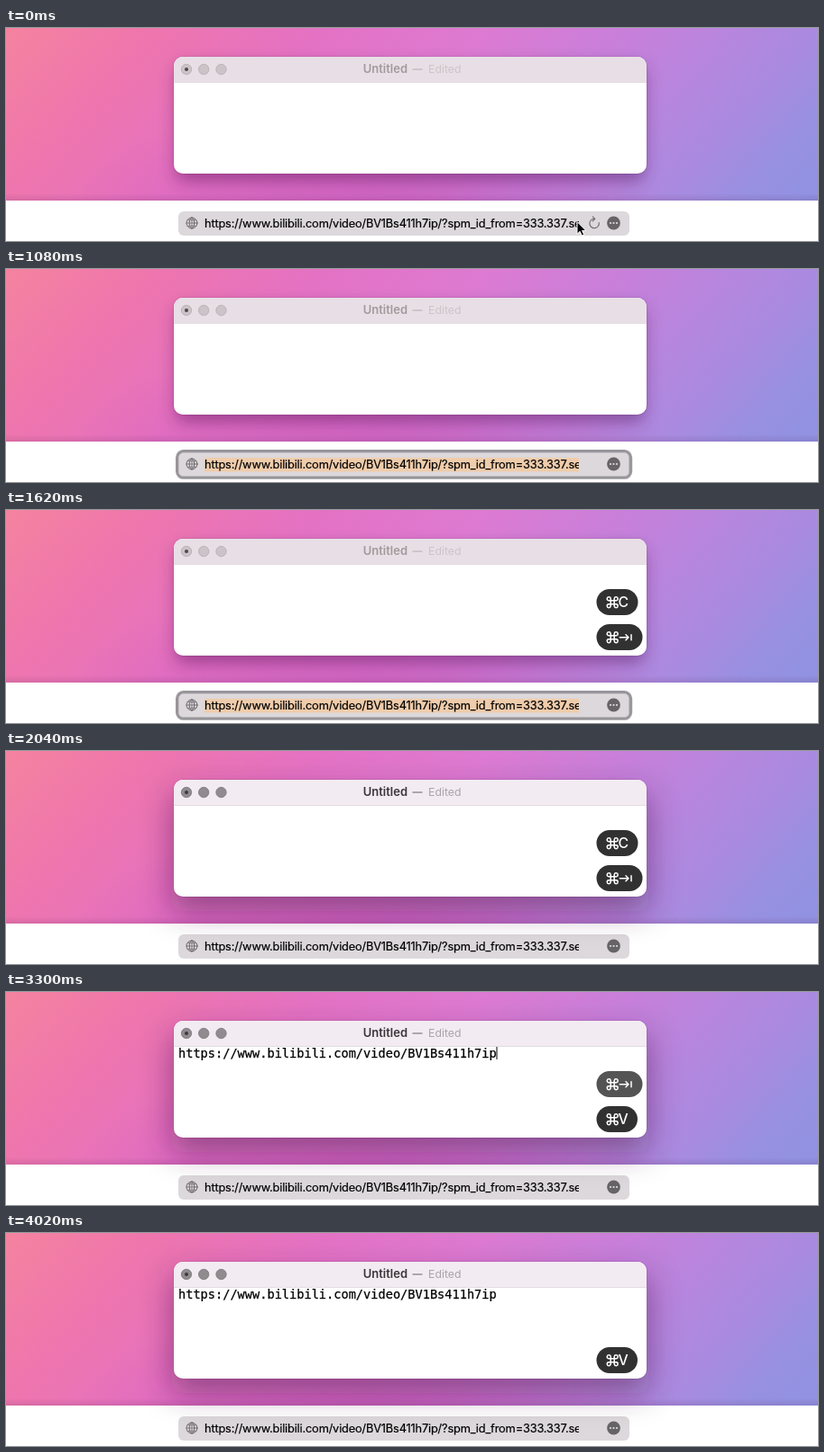
An HTML page that plays this animation: 900 by 237 pixels, repeating every 4080 ms.

```html
<!DOCTYPE html>
<html lang="en">
<head>
<meta charset="utf-8">
<title>Copy and paste an address</title>
<style>
  html, body { margin: 0; width: 100%; height: 100%; overflow: hidden; background: #fff; }
  svg { display: block; width: 900px; height: 237px; }
  text { font-family: Inter, Roboto, sans-serif; white-space: pre; }
  .url { font-size: 12.8px; letter-spacing: -.17px; fill: #000; stroke: #000; stroke-width: .2px; }
  .mono { font: 13.64px "DejaVu Sans Mono", "Liberation Mono", monospace; stroke: #000; stroke-width: .25px; }
  .line { fill: none; stroke-linecap: round; stroke-linejoin: round; }

  /* window colours by state */
  .idle   { --bar: #e8dfe6; --rule: #e4dbe1; --title: #a3989a; --note: #cdc4c9; --light: #cbc3c7; --rim: #b5adb1; --dot: #4b4649; }
  .active { --bar: #f3ebf2; --rule: #e3dbe1; --title: #393538; --note: #aaa3a8; --light: #8f8b8e; --rim: #7b777a; --dot: #3c393b; }
  .bar { fill: var(--bar); }
  .rule { fill: var(--rule); }
  .title { fill: var(--title); font-size: 13px; font-weight: 600; }
  .note { fill: var(--note); font-size: 12.3px; }
  .dash { stroke: var(--title); opacity: .75; }
  .light { fill: var(--light); stroke: var(--rim); stroke-width: .8px; }
  .dot { fill: var(--dot); }

  .pill rect { fill: #323131; }
  .pill text { fill: #fff; font-size: 15.8px; font-weight: 500; }
  .pill use, .pill path { stroke: #fff; stroke-width: 1.5px; }

  .anim { animation: 4080ms step-end infinite; }
  .pointer { animation-name: pointer; }
  .focus { animation-name: focus; }
  .ring { animation-name: ring; animation-timing-function: ease-out; transform-origin: 441px 217.5px; }
  .idle { animation-name: idle; }
  .active { animation-name: active; }
  .pasted { animation-name: pasted; }
  .caret { animation-name: caret; }
  .copy { animation-name: copy; animation-timing-function: linear; }
  .switch { animation-name: switch; animation-timing-function: linear; }
  .paste { animation-name: paste; animation-timing-function: linear; }

  @keyframes pointer { 0% { opacity: 1 } 7.35%, 100% { opacity: 0 } }
  @keyframes focus { 0% { opacity: 0 } 7.35% { opacity: 1 } 44.12%, 100% { opacity: 0 } }
  @keyframes ring {
    0%, 7.35% { opacity: 0; transform: scale(1.03, 1.2) }
    11.76%, 44.11% { opacity: 1; transform: none }
    44.12%, 100% { opacity: 0; transform: none }
  }
  @keyframes idle { 0% { opacity: 1 } 44.12%, 100% { opacity: 0 } }
  @keyframes active { 0% { opacity: 0 } 44.12%, 100% { opacity: 1 } }
  @keyframes pasted { 0% { opacity: 0 } 58.82%, 100% { opacity: 1 } }
  @keyframes caret {
    0% { opacity: 0 } 58.82% { opacity: 1 } 72.06% { opacity: 0 }
    79.41% { opacity: 1 } 94.12%, 100% { opacity: 0 }
  }
  @keyframes copy {
    0%, 27.94% { opacity: 0; transform: none }
    28.92%, 35.29% { opacity: 1; transform: none }
    37.5%, 57.35% { opacity: 1; transform: translateY(-39px) }
    59.56%, 70.59% { opacity: 1; transform: translateY(-78px) }
    79.41%, 100% { opacity: 0; transform: translateY(-78px) }
  }
  @keyframes switch {
    0%, 35.29% { opacity: 0; transform: none }
    37.5%, 57.35% { opacity: 1; transform: none }
    59.56%, 79.41% { opacity: 1; transform: translateY(-39px) }
    88.24%, 100% { opacity: 0; transform: translateY(-39px) }
  }
  @keyframes paste { 0%, 57.35% { opacity: 0 } 59.56%, 100% { opacity: 1 } }
</style>
</head>
<body>
<svg viewBox="0 0 900 237">
  <defs>
    <linearGradient id="sky" gradientUnits="userSpaceOnUse" x1="0" y1="0" x2="592" y2="532">
      <stop offset="0" stop-color="#f5839f"/>
      <stop offset=".16" stop-color="#ee75ae"/>
      <stop offset=".33" stop-color="#e472c4"/>
      <stop offset=".5" stop-color="#dd7ad2"/>
      <stop offset=".66" stop-color="#c680db"/>
      <stop offset=".76" stop-color="#b686de"/>
      <stop offset=".85" stop-color="#a88be0"/>
      <stop offset=".92" stop-color="#9890e1"/>
      <stop offset="1" stop-color="#9092e2"/>
    </linearGradient>
    <radialGradient id="glow">
      <stop offset="0" stop-color="#cc55b6" stop-opacity=".65"/>
      <stop offset="1" stop-color="#cc55b6" stop-opacity="0"/>
    </radialGradient>
    <linearGradient id="edge" x2="0" y2="1">
      <stop offset="0" stop-color="#502050" stop-opacity="0"/>
      <stop offset="1" stop-color="#502050" stop-opacity=".14"/>
    </linearGradient>
    <filter id="near" x="-20%" y="-60%" width="140%" height="220%"><feGaussianBlur stdDeviation="9"/></filter>
    <filter id="far" x="-20%" y="-60%" width="140%" height="220%"><feGaussianBlur stdDeviation="17"/></filter>
    <clipPath id="field"><rect x="219" y="205" width="416" height="26"/></clipPath>

    <g id="chrome">
      <path class="bar" d="M186 61V42a10 10 0 0 1 10-10H700a10 10 0 0 1 10 10V61z"/>
      <rect class="rule" x="186" y="60" width="524" height="1"/>
      <circle class="light" cx="200" cy="46" r="5.7"/>
      <circle class="light" cx="219.2" cy="46" r="5.7"/>
      <circle class="light" cx="238.5" cy="46" r="5.7"/>
      <circle class="dot" cx="200" cy="46" r="2"/>
      <text class="title" x="395.7" y="50">Untitled</text>
      <path class="dash" d="M450.5 46H461.5"/>
      <text class="note" x="468" y="50">Edited</text>
    </g>
    <path id="cmd" class="line" d="M-2-4.2V4.2A2 2 0 1 1-4.2 2H4.2A2 2 0 1 1 2 4.2V-4.2A2 2 0 1 1 4.2-2H-4.2A2 2 0 1 1-2-4.2z"/>
  </defs>

  <!-- desktop -->
  <rect width="900" height="192" fill="url(#sky)"/>
  <ellipse cx="400" cy="205" rx="330" ry="125" fill="url(#glow)"/>
  <rect y="184" width="900" height="8" fill="url(#edge)"/>

  <!-- browser -->
  <rect y="192" width="900" height="45" fill="#fff"/>
  <rect x="191" y="204" width="500" height="27" rx="6" fill="#ddd8db"/>
  <g class="anim focus">
    <rect x="220" y="210" width="415" height="15.5" fill="#efccab"/>
  </g>
  <rect class="anim ring" x="189.7" y="202.7" width="502.6" height="29.6" rx="7" fill="none" stroke="#98959a" stroke-width="3.4"/>
  <g class="line" stroke="#6b686b">
    <circle cx="206" cy="217" r="6"/>
    <ellipse cx="206" cy="217" rx="2.8" ry="6"/>
    <path d="M206 211V223M200 217H212M201.2 213.7H210.8M201.2 220.3H210.8" stroke-width=".8"/>
  </g>
  <g clip-path="url(#field)">
    <text class="url" x="220" y="222">https://www.bilibili.com/video/BV1Bs411h7ip/?spm_id_from=333.337.search-card</text>
  </g>
  <circle cx="673.5" cy="217" r="7.4" fill="#676467"/>
  <g fill="#e4dee2">
    <circle cx="670" cy="217" r="1.1"/><circle cx="673.5" cy="217" r="1.1"/><circle cx="677" cy="217" r="1.1"/>
  </g>
  <g class="anim pointer">
    <path class="line" d="M657.2 216.5A5.2 5.2 0 1 1 652 212.3M650.2 209.8L652.8 212.3L650.2 214.8" stroke="#6b686b" stroke-width="1.1"/>
    <path d="M633 215.5V229.3L636.2 226.3L638.3 231.1L640.7 230.1L638.6 225.4H642.8z" fill="#000" stroke="#fff" stroke-width="1"/>
  </g>

  <!-- editor -->
  <rect class="anim idle" x="188" y="42" width="520" height="128" rx="10" fill="#401040" fill-opacity=".4" filter="url(#near)"/>
  <rect class="anim active" x="184" y="47" width="528" height="131" rx="10" fill="#401040" fill-opacity=".46" filter="url(#far)"/>
  <rect x="185.5" y="31.5" width="525" height="131" rx="10.5" fill="none" stroke="#502050" stroke-opacity=".12"/>
  <rect x="186" y="32" width="524" height="130" rx="10" fill="#fff"/>
  <g class="anim idle"><use href="#chrome"/></g>
  <g class="anim active"><use href="#chrome"/></g>
  <text class="mono anim pasted" x="191" y="72.5">https://www.bilibili.com/video/BV1Bs411h7ip</text>
  <rect class="anim caret" x="543.5" y="61" width="1" height="14" fill="#000"/>

  <!-- key presses -->
  <g class="pill anim copy">
    <rect x="654.5" y="127" width="46" height="29" rx="14.5"/>
    <use href="#cmd" x="672.2" y="141.7"/>
    <text x="678.6" y="147.3">C</text>
  </g>
  <g class="pill anim switch">
    <rect x="654.5" y="127" width="51" height="29" rx="14.5"/>
    <use href="#cmd" x="672.2" y="141.7"/>
    <path class="line" d="M680.3 141.7H690M687 138.7L690 141.7L687 144.7M693 138.7V144.7"/>
  </g>
  <g class="pill anim paste">
    <rect x="654.5" y="127" width="45.5" height="29" rx="14.5"/>
    <use href="#cmd" x="672.2" y="141.7"/>
    <text x="678.4" y="147.3">V</text>
  </g>
</svg>
</body>
</html>
```
